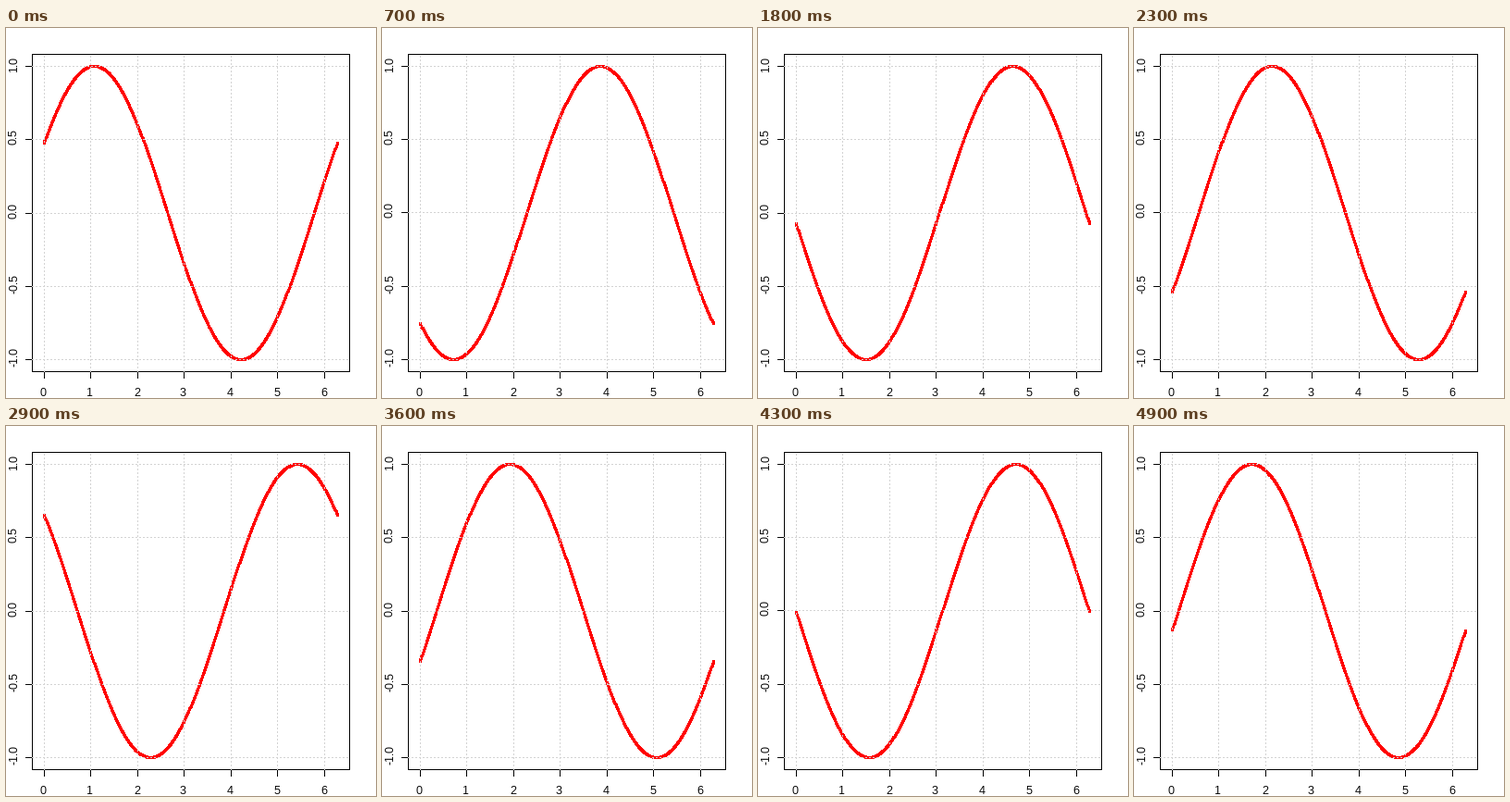
Animation, 400 px wide and 400 px high, one loop 5 s. Source, as a matplotlib script:

```python
import numpy as np
import matplotlib.pyplot as plt
from matplotlib.animation import FuncAnimation

plt.rcParams.update({
    "font.family": "Liberation Sans",
    "path.simplify": False,
    "text.hinting": "native",
    "text.hinting_factor": 1,
})

SIZE, DPI = 400, 100
PX = 72 / DPI                 # points per pixel
FRAMES, INTERVAL = 50, 100
LEFT, RIGHT = 28, 371         # plot box, the same on both axes
CENTER, SPAN = 200, 342.4 / 1.08
PHASE_STEP = 0.5
PEN = 0.45                    # pen centre within a pixel, biased up and left

xs = np.arange(629) / 100

fig = plt.figure(figsize=(SIZE / DPI, SIZE / DPI), dpi=DPI, facecolor="white")
ax = fig.add_axes([0, 0, 1, 1])
ax.set(xlim=(0, SIZE), ylim=(SIZE, 0))
ax.axis("off")


def x_pixel(x):
    return np.floor(CENTER + (x - xs[-1] / 2) * SPAN / xs[-1])


def line(x, y, color="black", width=1, **style):
    options = dict(antialiased=False, snap=False, solid_capstyle="butt",
                   dash_capstyle="butt")
    return ax.plot(x, y, color=color, lw=width * PX, **(options | style))[0]


def grid_line(x, y):
    # Smooth drawing keeps the dash lengths exact.
    return line(x, y, "lightgray", ls=(0, (2, 2)), zorder=4, antialiased=True)


def label(x, y, text, rotation=0):
    return ax.text(x, y, text, fontsize=12 * PX, rotation=rotation,
                   rotation_mode="anchor", ha="center", va="baseline")


low, high = LEFT + 0.5, RIGHT + 0.5
line([low, high, high, low, low], [low, low, high, high, low],
     solid_joinstyle="miter")

for value in range(7):
    x = x_pixel(value) + 0.5
    line([x, x], [RIGHT, RIGHT + 8])
    grid_line([x, x], [RIGHT + 1, LEFT])
    label(x - 1, 398, str(value))

levels = np.arange(-2, 3) / 2
y_ticks = [(line([21, LEFT], [0, 0]),
            grid_line([LEFT, RIGHT + 1], [0, 0]),
            label(12, 0, f"{level:.1f}", 90)) for level in levels]

curve = line([], [], "red", 2, zorder=3, solid_joinstyle="round",
             solid_capstyle="round")


def update(frame):
    values = np.sin(xs + (frame + 1) * PHASE_STEP)
    top, bottom = values.max(), values.min()

    # The vertical range follows the sampled extremes.
    def y_pixel(v):
        return np.floor(CENTER + ((top + bottom) / 2 - v) * SPAN / (top - bottom))

    curve.set_data(x_pixel(xs) + PEN, y_pixel(values) + PEN)
    for level, (tick, grid, text) in zip(levels, y_ticks):
        y = y_pixel(level) + 0.5
        tick.set_ydata([y, y])
        grid.set_ydata([y, y])
        text.set_y(y - 3)
    return [curve]


anim = FuncAnimation(fig, update, frames=FRAMES, interval=INTERVAL,
                     init_func=lambda: update(0), repeat=True, repeat_delay=0)
plt.show()
```
